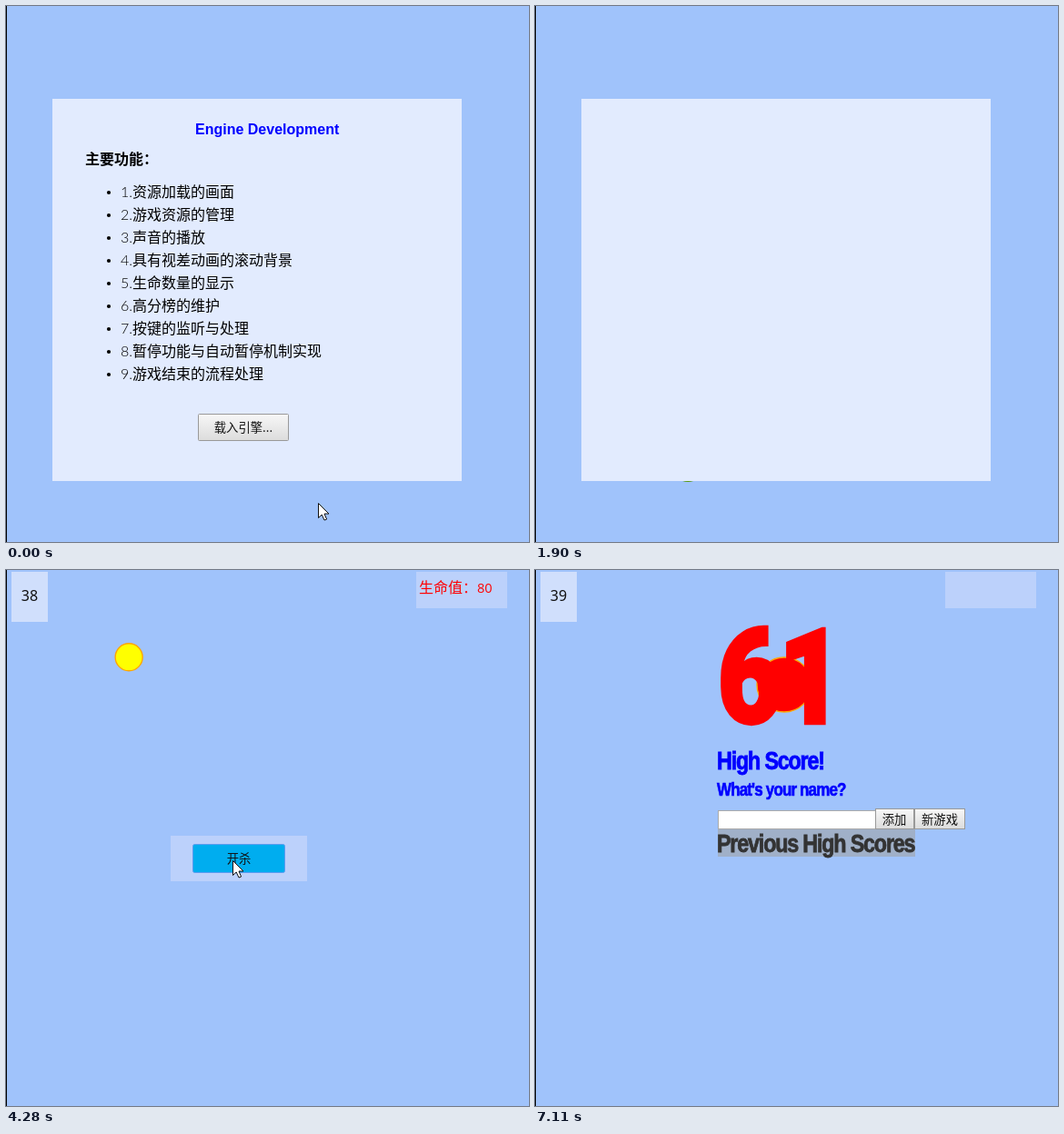
These frames come from a looping animation (575x589 px, 7190 ms). An HTML page:

```html
<!DOCTYPE html>
<html lang="zh">
<head>
<meta charset="utf-8">
<style>
html, body { margin: 0; width: 100%; height: 100%; overflow: hidden; background: #a0c3fb; }
svg { display: block; width: 575px; height: 589px; }
text { font: 13.33px "Noto Sans CJK SC", "Noto Sans CJK", sans-serif; fill: #111; white-space: pre; }
.mid { text-anchor: middle; }
.list text { font: 300 16px Lato, "Noto Sans CJK SC", "Noto Sans CJK", sans-serif; fill: #000; }
.list .head { font-weight: 700; }
.list .title { font: 700 16px "Liberation Sans", sans-serif; fill: #00f; }
.num { font: 16px "Noto Sans", sans-serif; }
#life { font: 16px "Noto Sans CJK SC", "Noto Sans CJK", sans-serif; fill: #f00; }
#life tspan { font: 14.5px "Open Sans", sans-serif; }
.heavy text { font: 700 23.3px "Liberation Sans", sans-serif; letter-spacing: -.05em; fill: #00f; stroke: #00f; stroke-width: .03em; }
.heavy .score { font: 900 122px Roboto, sans-serif; letter-spacing: -.03em; fill: #f00; stroke: #f00; }
.heavy .ask { font-size: 17px; }
.btn { fill: url(#grey); stroke: #999; }
.hot { fill: #00adef; stroke: #5c9cf0; }
</style>
</head>
<body>
<svg viewBox="0 0 575 589">
  <defs>
    <linearGradient id="grey" x2="0" y2="1"><stop stop-color="#f7f7f7"/><stop offset="1" stop-color="#dcdcdc"/></linearGradient>
  </defs>
  <rect width="575" height="589" fill="#a0c3fb"/>
  <rect width="1" height="589"/>

  <g id="hud">
    <rect x="6" y="2" width="40" height="55" fill="#d0dffc"/>
    <text id="count" class="num mid" x="26" y="34"></text>
    <rect x="451" y="2" width="100" height="40" fill="#bcd1fb"/>
    <text id="life" x="454" y="25">生命值：<tspan id="hp"></tspan></text>
  </g>
  <g id="fire">
    <rect x="181" y="292" width="150" height="50" fill="#bcd1fb"/>
    <rect x="206.5" y="302.5" width="99" height="29" fill="#ddd" stroke="#00a5ea"/>
    <rect id="fireHot" class="hot" x="205.5" y="301.5" width="101" height="31" rx="2"/>
    <text class="mid" x="256" y="322">开杀</text>
  </g>

  <circle id="ball" stroke-width="1.4"/>

  <rect id="panel" x="51" y="102" width="450" height="420" fill="#e2ebfe"/>
  <g id="list" class="list">
    <text class="title" x="208" y="141">Engine Development</text>
    <text class="head" x="87" y="174">主要功能：</text>
  </g>
  <g id="load">
    <rect class="btn" x="211.5" y="448.5" width="99" height="29" rx="1"/>
    <rect id="loadHot" class="hot" x="210.5" y="447.5" width="101" height="31" rx="2"/>
    <text class="mid" x="261" y="468">载入引擎...</text>
  </g>
  <g id="bar">
    <rect x="101.5" y="481.5" width="324" height="21" fill="#eee" stroke="#bbb"/>
    <rect id="fill" x="102" y="482" height="20" fill="#5fc13a"/>
    <text id="pct" class="mid" x="298" y="528"></text>
  </g>

  <g id="over">
    <g class="heavy">
      <text class="score" transform="translate(201 168) scale(1 1.18)">61</text>
      <text transform="translate(200 219) scale(1 1.2)">High Score!</text>
      <text class="ask" transform="translate(200 248) scale(1 1.2)">What's your name?</text>
      <rect id="mark" x="201" y="285" width="217" height="30"/>
      <text id="prev" transform="translate(200 310) scale(1 1.2)">Previous High Scores</text>
    </g>
    <rect x="201.5" y="264.5" width="173" height="20" fill="#fff" stroke="#aaa"/>
    <rect class="btn" x="374.5" y="262.5" width="42" height="22"/>
    <rect class="btn" x="417.5" y="262.5" width="55" height="22"/>
    <text class="mid" x="395" y="279">添加</text>
    <text class="mid" x="445" y="279">新游戏</text>
  </g>

  <path id="cursor" d="M.5 .5V16.5L4.2 13L7 19L9.6 18L7 12H12Z" fill="#fff" stroke="#111"/>
</svg>
<script>
const LOOP = 7190, TICK = 76.7;
const $ = id => document.getElementById(id);
const show = (id, on) => $(id).style.display = on ? '' : 'none';
const set = (id, attrs) => { for (const k in attrs) $(id).setAttribute(k, attrs[k]); };

const features = ['资源加载的画面', '游戏资源的管理', '声音的播放', '具有视差动画的滚动背景', '生命数量的显示',
  '高分榜的维护', '按键的监听与处理', '暂停功能与自动暂停机制实现', '游戏结束的流程处理'];
$('list').innerHTML += features.map((s, i) =>
  `<circle cx="113" cy="${205 + i * 25}" r="2.1"/><text x="126" y="${210 + i * 25}">${i + 1}.${s}</text>`).join('');

// Keys are [time, x, y]
const ballPath = [[1130, 265, 511], [1290, 245, 537], [1490, 223, 573], [1900, 168.5, 508], [2590, 95, 396],
  [3270, 16, 275], [4280, 135, 96], [4730, 187, 16], [5390, 262, 126]];
const cursorPath = [[70, 343, 546], [500, 290, 466], [2670, 290, 466], [2671, 345, 547], [3360, 330, 347],
  [3750, 249, 319], [4970, 249, 319], [5500, 243, 321], [6045, 243, 321], [6340, 464, 449]];

function along(path, t) {
  const i = path.findIndex(k => k[0] > t);
  if (i < 1) return path.at(i).slice(1);
  const [a, b] = [path[i - 1], path[i]], f = (t - a[0]) / (b[0] - a[0]);
  return [a[1] + (b[1] - a[1]) * f, a[2] + (b[2] - a[2]) * f];
}

// Last value whose start time has passed
const stage = (t, steps) => steps.filter(s => s[0] <= t).at(-1)[1];

function draw(t) {
  const tick = 1290 + Math.floor((t - 1282) / TICK) * TICK;
  const over = t >= 5430, playing = t >= 1980;

  show('panel', !playing);
  show('list', t < 1590);
  show('load', t < 670);
  show('loadHot', t >= 500);
  show('bar', t >= 670 && t < 980);
  const done = stage(t, [[0, .33], [820, .66], [900, 1]]);
  set('fill', { width: 323 * done });
  $('pct').textContent = Math.round(done * 100) + '%';

  show('hud', playing);
  show('fire', playing && !over);
  show('fireHot', t >= 3740);
  $('count').textContent = stage(t, [[0, 36], [3050, 37], [3820, 38], [5120, 39]]);
  $('hp').textContent = stage(t, [[0, 100], [4050, 80], [4520, 60], [5050, 40], [5280, 20]]);
  show('life', !over);

  const [x, y] = over ? [274, 126] : along(ballPath, tick);
  const green = t >= 1860 && !playing;
  show('ball', t >= 1130);
  set('ball', { cx: x, cy: y, r: over ? 30 : 15,
    fill: over ? '#f00' : green ? '#5a9a10' : '#ff0', stroke: green ? '#5a9a10' : '#ffa500' });

  const blurred = t >= 7110;
  show('over', over);
  set('mark', { fill: blurred ? '#a0b0c8' : '#1e86ff' });
  $('prev').style.fill = $('prev').style.stroke = blurred ? '#333' : '#fff';

  show('cursor', t < 900 || t >= 2740 && t < 6420);
  set('cursor', { transform: `translate(${along(cursorPath, tick).map(Math.round)})` });
}

const start = performance.now();
(function loop() {
  draw((performance.now() - start) % LOOP);
  requestAnimationFrame(loop);
})();
</script>
</body>
</html>
```
